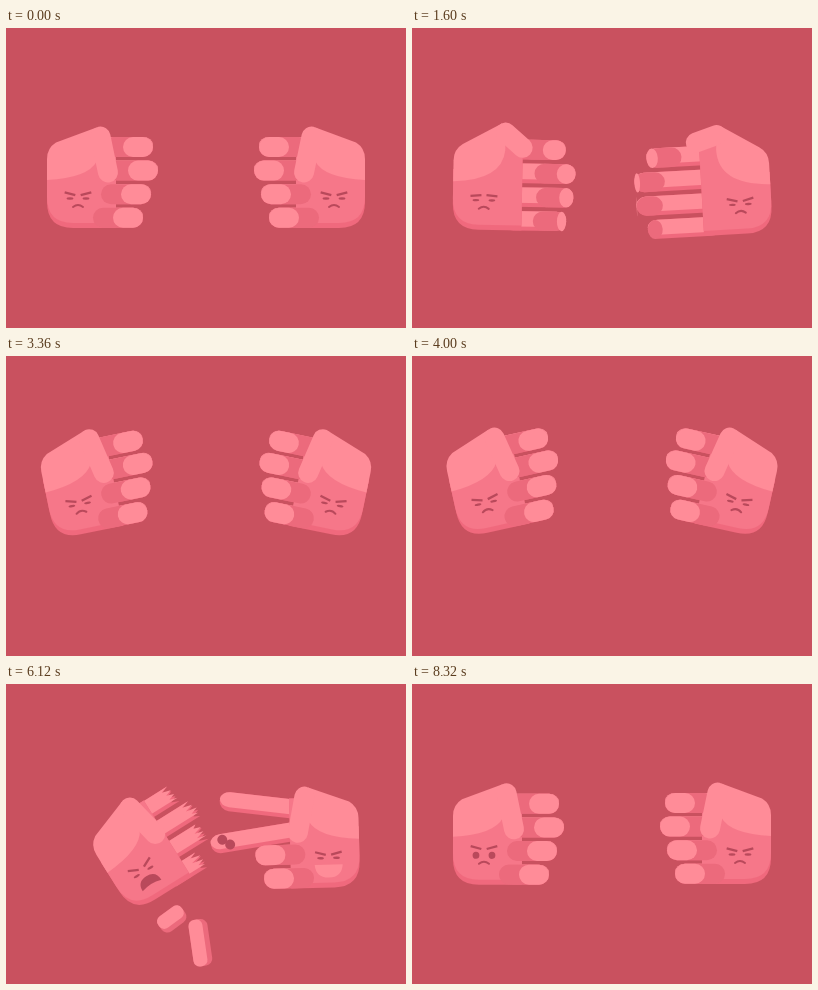
Write an HTML page that moves like this. It is 400 px wide and 300 px high and loops after 8.36 s.

```html
<!DOCTYPE html>
<html lang="en">
<head>
<meta charset="utf-8">
<title>Rock paper scissors</title>
<style>
html, body { margin: 0; width: 100%; height: 100%; overflow: hidden; background: #c9515f; }
svg { display: block; width: 100%; height: 100%; }
</style>
</head>
<body>
<svg id="stage" viewBox="0 0 400 300"></svg>
<script>
const LOOP = 8360, ROUND_2 = 3160, SNIP_1 = 5470, SNIP_2 = 5690, FALL = 6500, RETURN = 7790;
const BG = '#c9515f', LIGHT = '#ff8c98', PALM = '#f67789', BODY = '#ec6a7c', SHADE = '#f0697d', DARK = '#b9495b';
const FIST = [147, 152, 145, 137], OPEN = [180, 190, 184, 169];
const FINGERS = [0, 1, 2, 3];
const stage = document.getElementById('stage');

const mix = (a, b, k) => a + (b - a) * k;
const clamp = v => Math.max(0, Math.min(1, v));
const ease = k => (1 - Math.cos(Math.PI * clamp(k))) / 2;
const ramp = (t, start, dur) => ease((t - start) / dur);
const pulse = (t, up, down, dur) => ramp(t, up, dur) - ramp(t, down, dur);
const n = v => +v.toFixed(2);
const noise = i => Math.abs(Math.sin(i * 12.9898) * 43758.5) % 1;

// Height of the fist: wind up, shake for some beats, then throw and settle.
function throwLift(t, beats, dip) {
  if (t < 240) return ease(t / 240);
  t -= 240;
  if (t < beats * 600) return Math.cos(2 * Math.PI * t / 600);
  t -= beats * 600;
  return t < 250 ? mix(1, -dip, ease(t / 250)) : -dip * (1 - ramp(t, 250, 220));
}

function lift(t, dip, top) {
  const recoil = ramp(t, 2000, top - 2000) - ramp(t, top, 600);
  return (t < ROUND_2 ? throwLift(t, 2, dip) : throwLift(t - ROUND_2, 1, dip)) + recoil;
}

// A pose is [x, y, turn]; moves are added with a weight.
const lifted = u => [-3 * u, -27 * u, -12.5 * u];
const add = (pose, weight, move) => pose.map((v, i) => v + weight * move[i]);

function leftPose(t) {
  if (t > 7400) {
    const s = clamp((t - RETURN) / (LOOP - 20 - RETURN));
    const y = 240 * (1 - s) * Math.exp(-2.4 * s) * Math.cos(2 * Math.PI * s);
    return [0, y, y * .08];
  }
  const drop = Math.max(0, (t - FALL) / 650);
  const pose = add(lifted(lift(t, .5, 2260)), ramp(t, SNIP_2, 400), [52, 11, -32]);
  return add(pose, drop * drop, [6, 230, -30]);
}

function rightPose(t) {
  let pose = lifted(lift(t, .75, 2200));
  pose = add(pose, pulse(t, 4420, 5100, 270), [19, -41, -28]);
  pose = add(pose, pulse(t, 5110, 5660, 250), [60, 16, 5]);
  pose = add(pose, pulse(t, 5800, FALL, 280), [6, 4, 1.5]);
  return add(pose, pulse(t, FALL, 6850, 350), [-36, 6, -7]);
}

function snipAngle(t) {
  const snip = t > 5250 && t < SNIP_2 ? 13 * Math.abs(Math.sin(Math.PI * (t - 5250) / 220)) : 0;
  return 10 * pulse(t, 4150, 4400, 200) + snip + 8 * pulse(t, SNIP_2, FALL, 220);
}

function leftMood(t) {
  const tired = pulse(t, 1400, 1800, 120), open = pulse(t, 1800, 3160, 120) + ramp(t, 7400, 120);
  const worry = pulse(t, 4100, 5440, 120), cry = pulse(t, 5440, 7300, 120);
  return {
    eye: 1.2 + 2.4 * open + 3.2 * worry,
    tilt: 15 - 20 * tired - 30 * worry + 11 * cry,
    brow: 165.8 - 3 * open - 5 * worry - 2 * cry,
    wail: .75 * worry + cry,
    grin: 0
  };
}

function rightMood(t) {
  const open = pulse(t, 2000, 3160, 120) + pulse(t, 7000, 7360, 120);
  const aim = pulse(t, 4240, 5300, 120), grin = pulse(t, 4240, 7000, 120);
  return { eye: 1.2 + 2.2 * open + 1.8 * aim, tilt: 15 + 4 * aim, brow: 165.8 - 3 * open, wail: 0, grin };
}

function face({ eye, tilt, brow, wail, grin }) {
  let s = '';
  for (const side of [-1, 1]) {
    const x = 72 + side * 8;
    s += `<ellipse cx="${x}" cy="170.5" rx="3.4" ry="${n(eye)}" fill="${DARK}"/>` +
      `<path d="M${x - 5.5} ${n(brow)}h11" transform="rotate(${n(-side * tilt)} ${x} ${n(brow)})" stroke="${DARK}" stroke-width="2.3"/>`;
  }
  if (grin > .02) {
    return s + `<path d="M58 177H86Q85 190 72 190T58 177Z" fill="${LIGHT}" transform="translate(72 177) scale(${n(grin)}) translate(-72 -177)"/>`;
  }
  if (wail > .02) {
    const w = 6 + 5 * wail, h = 11 * wail;
    return s + `<path d="M${n(72 - w)} ${n(181 + h / 2)}q0 ${n(-h)} ${n(w)} ${n(-h)}t${n(w)} ${n(h)}q${n(-w)} ${n(-h / 3)} ${n(-2 * w)} 0Z" fill="${DARK}"/>`;
  }
  return s + `<path d="M67 179Q72 175 77 179" fill="none" stroke="${DARK}" stroke-width="2" stroke-linecap="round"/>`;
}

function pill(x0, x1, y, h, fill) {
  const w = Math.max(0, x1 - x0);
  return `<rect x="${n(x0)}" y="${n(y)}" width="${n(w)}" height="${n(h)}" rx="${n(Math.min(10, w / 2))}" ry="${n(h / 2)}" fill="${fill}"/>`;
}

function stump(i, x, y, h, fill) {
  let d = `M92 ${y}H${x}`;
  for (let j = 1; j <= 6; j++) d += `L${n(x + (j % 2 ? -6 : 3) * (.4 + noise(i * 9 + j)))} ${n(y + h * j / 6)}`;
  return `<path d="${d}H92Z" fill="${fill}"/>`;
}

function finger(i, e, angle, cut) {
  const tip = mix(FIST[i], OPEN[i], e), fold = 1 - e;
  const y = 109 + 23.6 * i + 1.5 * e, h = 20 - e;
  const turn = s => `<g transform="rotate(${n(angle)} 110 ${n(y + h / 2)})">${s}</g>`;
  if (cut) {
    const end = OPEN[i] - 43;
    return { back: stump(i, end, y, h, SHADE) + stump(i, end, y, h - 4, LIGHT), front: '' };
  }
  const back = pill(92, tip, y, h, SHADE) + pill(92, tip, y, h - 4, LIGHT);
  const folded = pill(tip - 20 * Math.min(1, fold * 6) - 30 * fold, tip, y, h, BODY) +
    pill(tip - 30 * clamp(1 - e / .8), tip, y, h, LIGHT);
  return { back: turn(back), front: fold > .01 ? turn(folded) : '' };
}

// Back of the hand plus a round thumb running from knuckle to tip.
function thumb(k) {
  const kx = n(mix(94.5, 91, k)), ky = n(mix(108.5, 96.5, k));
  const tx = n(mix(102, 117.5, k)), ty = n(mix(144.5, 91, k));
  const web = n(mix(91, 94, k)), webY = n(mix(133, 108, k));
  return `<path d="M41 152V131Q41 120 50 114.5L${kx - 4} ${ky - 9}L${kx} ${ky}L${web} ${webY}Q${n(mix(82, 97, k))} 150 41 152Z" fill="${LIGHT}"/>` +
    `<path d="M${kx} ${ky}L${tx} ${ty}" stroke="${LIGHT}" stroke-width="20" stroke-linecap="round"/>`;
}

const palm = (bottom, fill) =>
  `<path d="M41 140V${bottom - 26}Q41 ${bottom} 67 ${bottom}H110V110H88V118H62Z" fill="${fill}"/>`;

function hand({ pose, ext, out, angle, cut, mood, marks, flip }) {
  const parts = FINGERS.map(i => finger(i, ext(i), [-angle, angle, 0, 0][i], cut(i)));
  const [x, y, r] = pose.map(n);
  const spots = `<g transform="rotate(${n(angle)} 110 143)" fill="${DARK}"><circle cx="178" cy="140" r="5"/><circle cx="171" cy="146" r="5"/></g>`;
  return `<g transform="${flip ? 'translate(400 0) scale(-1 1) ' : ''}translate(${x} ${y}) rotate(${r} 90 150)">` +
    parts.map(p => p.back).join('') + (marks ? spots : '') +
    palm(200, SHADE) + palm(195, PALM) +
    parts.map(p => p.front).join('') + thumb(out) + face(mood) + '</g>';
}

const cutTime = i => i < 2 ? SNIP_2 : SNIP_1;

function piece(i, t) {
  const s = (t - cutTime(i)) / 1000, odd = i % 2;
  if (s < 0 || s > 1) return '';
  const len = 29 + 18 * odd;
  const x = OPEN[i] - 21 + (16 + 43 * odd) * s;
  const y = 119 + 23.6 * i + 625 * s * s;
  return `<g transform="translate(${n(x)} ${n(y)}) rotate(${n(-(84 + 144 * odd) * s)})">` +
    `<rect x="${-len / 2}" y="-9.5" width="${len}" height="19" rx="7" fill="${BODY}"/>` +
    `<rect x="${-len / 2}" y="-9.5" width="${len}" height="14" rx="6" fill="${LIGHT}"/></g>`;
}

function draw(t) {
  const back = t > 7400;
  const left = {
    pose: leftPose(t),
    ext: i => back ? 0 : pulse(t, 1533 - 20 * i, 2250 + 20 * i, 240) + ramp(t, 4093 - 20 * i, 240),
    out: back ? 0 : pulse(t, 1500, 2200, 200) + pulse(t, 4060, SNIP_2, 200),
    angle: 0,
    cut: i => !back && t >= cutTime(i),
    mood: leftMood(t)
  };
  const right = {
    pose: rightPose(t),
    ext: i => pulse(t, 1482 - 24 * i, 2120 + 20 * i, 240) +
      (i < 2 ? pulse(t, 4038, 7040 + 130 * i, 300) : 0),
    out: pulse(t, 1460, 2080, 220),
    angle: snipAngle(t),
    cut: () => false,
    mood: rightMood(t),
    marks: t > SNIP_2 && t < 6600,
    flip: true
  };
  stage.innerHTML = `<rect width="400" height="300" fill="${BG}"/>` +
    hand(left) + FINGERS.map(i => piece(i, t)).join('') + hand(right);
}

const begin = performance.now();
function tick(now) {
  draw(Math.max(0, now - begin) % LOOP);
  requestAnimationFrame(tick);
}
draw(0);
requestAnimationFrame(tick);
</script>
</body>
</html>
```
